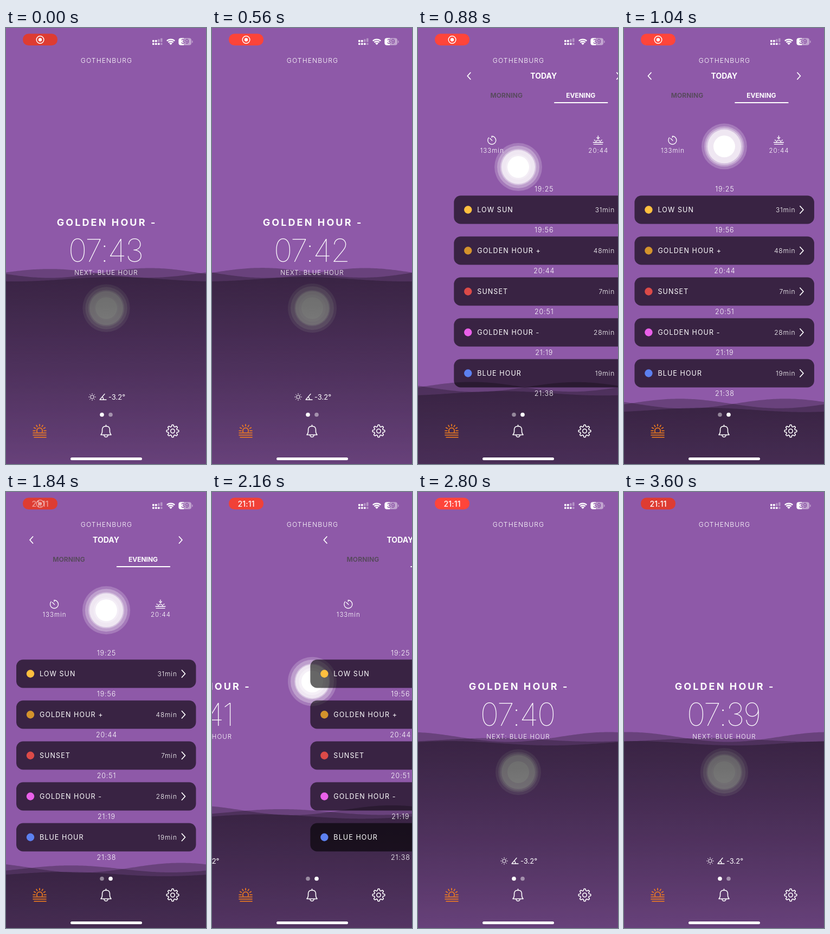
An HTML page with a canvas that plays this animation: 369x800 px, repeating every 3.68 s.

```html
<!DOCTYPE html>
<html lang="en">
<head>
<meta charset="utf-8">
<style>
html, body { margin: 0; width: 100%; height: 100%; overflow: hidden; background: #8e59a8; }
canvas { display: block; width: 369px; height: 800px; }
</style>
</head>
<body>
<canvas id="stage" width="369" height="800"></canvas>
<script>
const W = 369, H = 800, LOOP = 3680, TAU = Math.PI * 2;
const BG = '#8e59a8', WHITE = '#fff', ORANGE = '#f9811c';
const ctx = document.getElementById('stage').getContext('2d');

const clamp = v => Math.min(1, Math.max(0, v));
const settle = (t, start) => 1 - Math.pow(1 - clamp((t - start) / 430), 2.5);
const pagePosition = t => settle(t, 640) - settle(t, 2072);

function text(str, x, y, size, weight, spacing = 0, align = 'center', color = WHITE) {
  ctx.font = `${weight} ${size}px Inter, sans-serif`;
  ctx.letterSpacing = spacing + 'px';
  ctx.textAlign = align;
  ctx.fillStyle = color;
  const shift = { center: spacing / 2, right: spacing, left: 0 }[align];
  ctx.fillText(str, x + shift, y);
}

function disc(x, y, r, color) {
  ctx.fillStyle = color;
  ctx.beginPath();
  ctx.arc(x, y, r, 0, TAU);
  ctx.fill();
}

function ring(x, y, r, from = 0, to = TAU) {
  ctx.beginPath();
  ctx.arc(x, y, r, from, to);
  ctx.stroke();
}

function box(x, y, w, h, r, color) {
  ctx.fillStyle = color;
  ctx.beginPath();
  ctx.roundRect(x, y, w, h, r);
  ctx.fill();
}

function line(...pts) {
  ctx.beginPath();
  for (let i = 0; i < pts.length; i += 2) ctx.lineTo(pts[i], pts[i + 1]);
  ctx.stroke();
}

function pen(color, width) {
  ctx.strokeStyle = color;
  ctx.lineWidth = width;
  ctx.lineCap = ctx.lineJoin = 'round';
}

function rays(x, y, inner, outer, count, from, step) {
  for (let i = 0; i < count; i++) {
    const a = from + i * step, c = Math.cos(a), s = Math.sin(a);
    line(x + c * inner, y + s * inner, x + c * outer, y + s * outer);
  }
}

function at(x, y, draw) {
  ctx.save();
  ctx.translate(x, y);
  draw();
  ctx.restore();
}

function drawSun(t, p) {
  const y = 514 - 297 * p;
  const u = ((t - 1640 + 1760) % 1760) / 1160;
  const pulse = u < 1 ? Math.sqrt(Math.sin(Math.PI * u)) : 0;
  const layers = [[42 + 3 * pulse, .2], [37 + 3 * pulse, .28], [34 - pulse, .35], [31, .62],
                  [20 + 5 * pulse, .35 * pulse], [20, 1]];
  for (const [r, a] of layers) disc(W / 2 + .5, y, r, `rgba(255,255,255,${a})`);
}

function drawWave(trough, amp, crest, offset) {
  const y = trough - amp + offset;
  const fill = ctx.createLinearGradient(0, y, 0, y + 345);
  fill.addColorStop(0, 'rgba(0,0,0,.263)');
  fill.addColorStop(1, 'rgba(0,0,0,.1)');
  ctx.fillStyle = fill;
  ctx.beginPath();
  ctx.moveTo(0, H);
  for (let x = 0; x <= W + 3; x += 3) ctx.lineTo(x, y - amp * Math.cos((x - crest) / W * TAU));
  ctx.lineTo(W + 3, H);
  ctx.fill();
}

function drawWaves(t, p) {
  const s = t / 1000, offset = 240 * p;
  const swell = 6 + 3 * Math.cos((s - .7) / 5 * TAU);
  drawWave(458, swell, 80 + 22 * s, offset);
  drawWave(458.5, 9, 265 + 31 * s, offset);
  drawWave(465, 4, 200 - 50 * s, offset);
}

function drawHome(t) {
  text('GOLDEN HOUR -', 184.5, 363, 18, 700, 3.1);
  text('07:' + (43 - Math.floor(t / 1000 + .5)), 184.5, 429, 58, 100, -2);
  text('NEXT: BLUE HOUR', 184.5, 453, 11.5, 300, 1.05);
  pen(WHITE, 1);
  ring(159, 677, 3.2);
  rays(159, 677, 5, 6.3, 8, 0, TAU / 8);
  pen(WHITE, 1.3);
  line(182, 671.5, 173, 682, 185, 682);
  ring(173, 682, 7, -.85, 0);
  text('-3.2°', 189, 681.5, 13, 400, 0, 'left');
}

const periods = [
  ['LOW SUN', '31min', '19:25', '#ffbf3f'],
  ['GOLDEN HOUR +', '48min', '19:56', '#d4932c'],
  ['SUNSET', '7min', '20:44', '#dc4a48'],
  ['GOLDEN HOUR -', '28min', '20:51', '#ea60ea'],
  ['BLUE HOUR', '19min', '21:19', '#5c80f0']
];

function drawList() {
  text('TODAY', 184.5, 93, 14, 700);
  pen(WHITE, 1.8);
  line(49.5, 82, 44, 88, 49.5, 94);
  line(319.5, 82, 325, 88, 319.5, 94);
  text('MORNING', 116, 128.3, 12, 700, .1, 'center', '#584a5e');
  text('EVENING', 253, 128.3, 12, 700);
  box(204, 136, 99, 2, 0, WHITE);

  pen(WHITE, 1.3);
  ring(89, 206, 7.5, -Math.PI / 2, Math.PI * 1.22);
  line(89, 198.5, 89, 201);
  line(85.5, 202.5, 89.5, 206.5);
  text('133min', 89, 229.3, 11.5, 300, 1);

  ring(285, 210, 4.2, Math.PI, TAU);
  line(276, 210, 294, 210);
  line(277, 213.3, 293, 213.3);
  rays(285, 210, 6.3, 8.3, 2, -Math.PI * .82, Math.PI * .64);
  line(285, 198, 285, 203);
  line(282.7, 201, 285, 203.3, 287.3, 201);
  text('20:44', 285, 229.3, 11.5, 300, 1);

  periods.forEach(([name, length, start, color], i) => {
    const y = 333.5 + 75 * i;
    text(start, 185, y - 33.7, 12.5, 300, .9);
    box(19, y - 26, 331.5, 52, 12.5, 'rgba(0,0,0,.6)');
    disc(45, y, 7.2, color);
    text(name, 62, y + 4.5, 12.5, 400, 1.1, 'left');
    text(length, 315, y + 4.2, 12, 300, .8, 'right');
    pen(WHITE, 1.8);
    line(324.5, y - 6.5, 330.5, y, 324.5, y + 6.5);
  });
  text('21:38', 185, 674.8, 12.5, 300, .9);
}

function drawSunriseIcon() {
  pen(ORANGE, 1.6);
  ring(0, 0, 5.2, Math.PI * .85, Math.PI * 2.15);
  rays(0, 0, 8.5, 11.8, 5, -Math.PI * .84, Math.PI * .17);
  line(-12, 0, -8, 0);
  line(8, 0, 12, 0);
  line(-12, 4, 12, 4);
  line(-12, 8, 12, 8);
  line(-10, 12, 12, 12);
}

function drawBellIcon() {
  pen(WHITE, 1.6);
  ctx.beginPath();
  ctx.moveTo(-9.5, 7);
  ctx.bezierCurveTo(-5, 2, -8, -2, -6.5, -5);
  ctx.bezierCurveTo(-5, -10, 5, -10, 6.5, -5);
  ctx.bezierCurveTo(8, -2, 5, 2, 9.5, 7);
  ctx.closePath();
  ctx.stroke();
  line(0, -11, 0, -9);
  ring(0, 7.5, 3.5, 0, Math.PI);
}

function drawGearIcon() {
  pen(WHITE, 1.6);
  ctx.beginPath();
  for (let i = 0; i < 120; i++) {
    const a = i / 120 * TAU;
    const r = 9.8 + 1.6 * Math.tanh(2 * Math.cos(8 * a));
    ctx.lineTo(r * Math.cos(a), r * Math.sin(a));
  }
  ctx.closePath();
  ctx.stroke();
  ring(0, 0, 3.7);
}

function drawTabs(p) {
  const faint = 'rgba(255,255,255,.45)';
  disc(177, 709.5, 3.8, p < .5 ? WHITE : faint);
  disc(193, 709.5, 3.8, p < .5 ? faint : WHITE);
  at(62, 739, drawSunriseIcon);
  at(184.5, 739.5, drawBellIcon);
  at(307.5, 739.5, drawGearIcon);
  box(119, 788, 132, 5, 2.5, WHITE);
}

function drawPill(t) {
  const dim = Math.pow(.5 + .5 * Math.cos(t / 1800 * TAU), 2);
  const clock = clamp((t - 1720) / 240);
  box(31, 10.5, 64, 21.5, 10.5, `rgb(${255 - 33 * dim},${69 - 9 * dim},${58 - 8 * dim})`);
  ctx.globalAlpha = 1 - clock;
  pen(WHITE, 1.5);
  ring(63, 21.5, 6.8);
  disc(63, 21.5, 3.2, WHITE);
  ctx.globalAlpha = clock;
  text('21:11', 63, 26.7, 14, 500, .2);
  ctx.globalAlpha = 1;
}

function drawStatus() {
  const faint = 'rgba(255,255,255,.35)';
  for (let i = 0; i < 4; i++) {
    const x = 270 + i * 5;
    box(x, 27.5, 3.6, 3.6, 1, i < 3 ? WHITE : faint);
    const h = 3.6 + Math.max(0, i - 1) * 1.7;
    box(x, 25.7 - h, 3.6, h, 1, i < 2 ? WHITE : faint);
  }
  pen(WHITE, 2.3);
  ctx.lineCap = 'butt';
  ring(304, 31, 10.2, -Math.PI * .75, -Math.PI * .25);
  ring(304, 31, 6.5, -Math.PI * .75, -Math.PI * .25);
  ctx.fillStyle = WHITE;
  ctx.beginPath();
  ctx.moveTo(304, 31);
  ctx.arc(304, 31, 4, -Math.PI * .75, -Math.PI * .25);
  ctx.fill();
  box(318.5, 18.5, 23.5, 13, 4, 'rgba(255,255,255,.45)');
  box(318.5, 18.5, 9.5, 13, [4, 0, 0, 4], WHITE);
  box(343, 23, 1.5, 4.5, 1, 'rgba(255,255,255,.45)');
  text('39', 330.2, 29.2, 11.5, 700, 0, 'center', BG);
}

function drawFrame(now) {
  const t = now % LOOP, p = pagePosition(t);
  ctx.fillStyle = BG;
  ctx.fillRect(0, 0, W, H);
  drawSun(t, p);
  drawWaves(t, p);
  at(-W * p, 0, () => drawHome(t));
  at(W * (1 - p), 0, drawList);
  text('GOTHENBURG', 185, 63.5, 12.2, 300, 1.05);
  drawTabs(p);
  drawPill(t);
  drawStatus();
}

const begin = performance.now();
function tick() {
  drawFrame(performance.now() - begin);
  requestAnimationFrame(tick);
}
tick();
</script>
</body>
</html>
```
